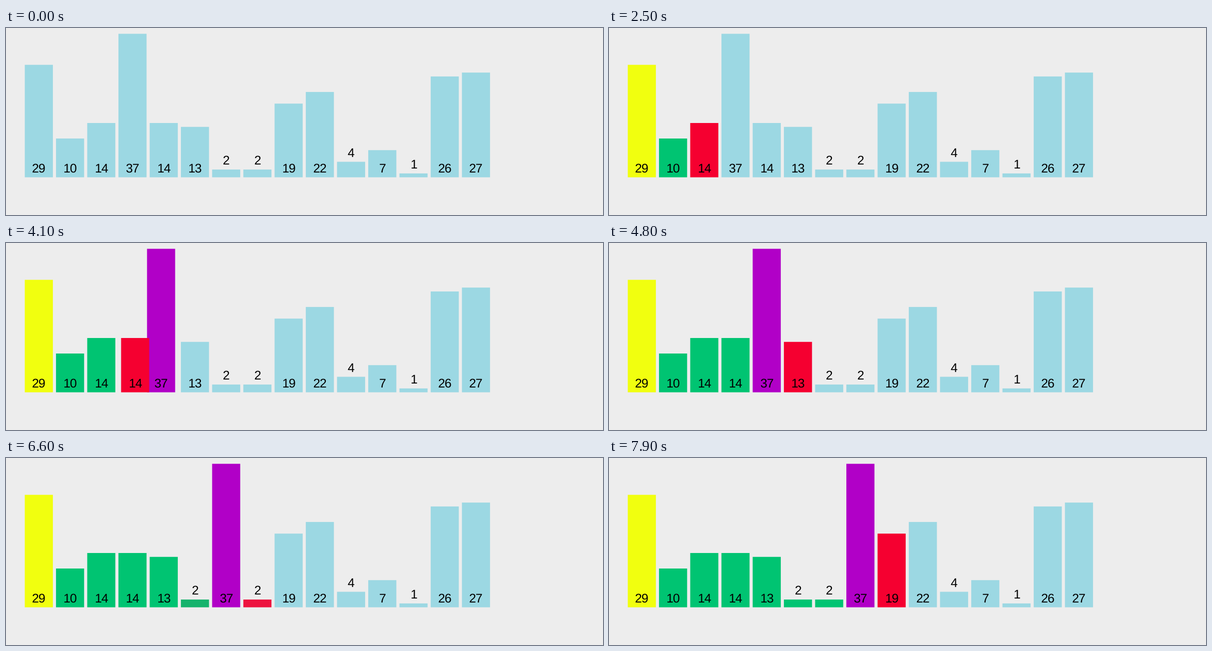
These frames come from a looping animation (1195 px wide and 374 px high, 8 s). A matplotlib script:

```python
import matplotlib.pyplot as plt
from matplotlib.animation import FuncAnimation
from matplotlib.colors import to_rgb
from matplotlib.patches import Rectangle
import numpy as np

plt.rcParams["font.family"] = "Liberation Sans"
plt.rcParams["text.hinting"] = "none"

WIDTH, HEIGHT, DPI = 1195, 374, 100
INTERVAL, FRAMES = 100, 80
FADE = 300            # length of one transition in ms
HOLD = 0.914          # a colour rests here until it settles

VALUES = [29, 10, 14, 37, 14, 13, 2, 2, 19, 22, 4, 7, 1, 26, 27]
LEFT, PITCH, BAR_WIDTH = 37.6, 62.5, 56.25
BASE, UNIT = 298.6, 7.757

BLUE, YELLOW, RED, GREEN, PURPLE = (
    np.array(to_rgb(c))
    for c in ("#9cd8e3", "#f1ff0f", "#f50030", "#00c472", "#b100c7"))

# Colour changes: start, settle time, {bar: new colour}
RECOLOUR = [
    (383, 700, {0: YELLOW}),
    (883, 1400, {1: RED}),
    (1883, 2500, {1: GREEN, 2: RED}),
    (2883, 3500, {2: GREEN, 3: RED}),
    (3383, 3900, {3: PURPLE, 4: RED}),
    (4383, 4800, {4: GREEN, 5: RED}),
    (5383, 5800, {5: GREEN, 6: RED}),
    (6383, 6800, {6: GREEN, 7: RED}),
    (7383, 7900, {7: GREEN, 8: RED}),
]
# Swaps: start, pair of bars
SWAPS = [(3883, 3, 4), (4883, 3, 5), (5883, 3, 6), (6883, 3, 7)]


def ease(now, start):
    """Cubic ease in and out."""
    t = min(max((now - start) / FADE, 0), 1)
    return 4 * t**3 if t < 0.5 else 1 - 4 * (1 - t)**3


def colours_at(now):
    colours = [BLUE] * len(VALUES)
    for start, settle, changes in RECOLOUR:
        p = ease(now, start)
        if now < settle:
            p = min(p, HOLD)
        for bar, colour in changes.items():
            colours[bar] = colours[bar] + (colour - colours[bar]) * p
    return colours


def slots_at(now):
    slots = [float(i) for i in range(len(VALUES))]
    for start, a, b in SWAPS:
        shift = (slots[b] - slots[a]) * ease(now, start)
        slots[a] += shift
        slots[b] -= shift
    return slots


def label_baseline(value):
    return 289 if value >= 5 else BASE - value * UNIT - 9.7


fig = plt.figure(figsize=(WIDTH / DPI, HEIGHT / DPI), dpi=DPI,
                 facecolor="#ededed")
ax = fig.add_axes([0, 0, 1, 1])
ax.set(xlim=(0, WIDTH), ylim=(HEIGHT, 0))
ax.axis("off")

bars, labels = [], []
for value in VALUES:
    height = value * UNIT
    bar = Rectangle((0, BASE - height), BAR_WIDTH, height, lw=0, snap=False)
    bars.append(ax.add_patch(bar))
    labels.append(ax.text(0, label_baseline(value), str(value),
                          size=25 * 72 / DPI, color="black",
                          ha="center", va="baseline"))


def draw(frame):
    now = frame * INTERVAL
    for bar, label, slot, colour in zip(bars, labels, slots_at(now),
                                        colours_at(now)):
        x = LEFT + PITCH * slot
        bar.set_x(x)
        bar.set_facecolor(np.clip(colour, 0, 1))
        label.set_x(x + BAR_WIDTH / 2)
    return bars + labels


anim = FuncAnimation(fig, draw, frames=FRAMES, interval=INTERVAL,
                     repeat=True, repeat_delay=0)
plt.show()
```
